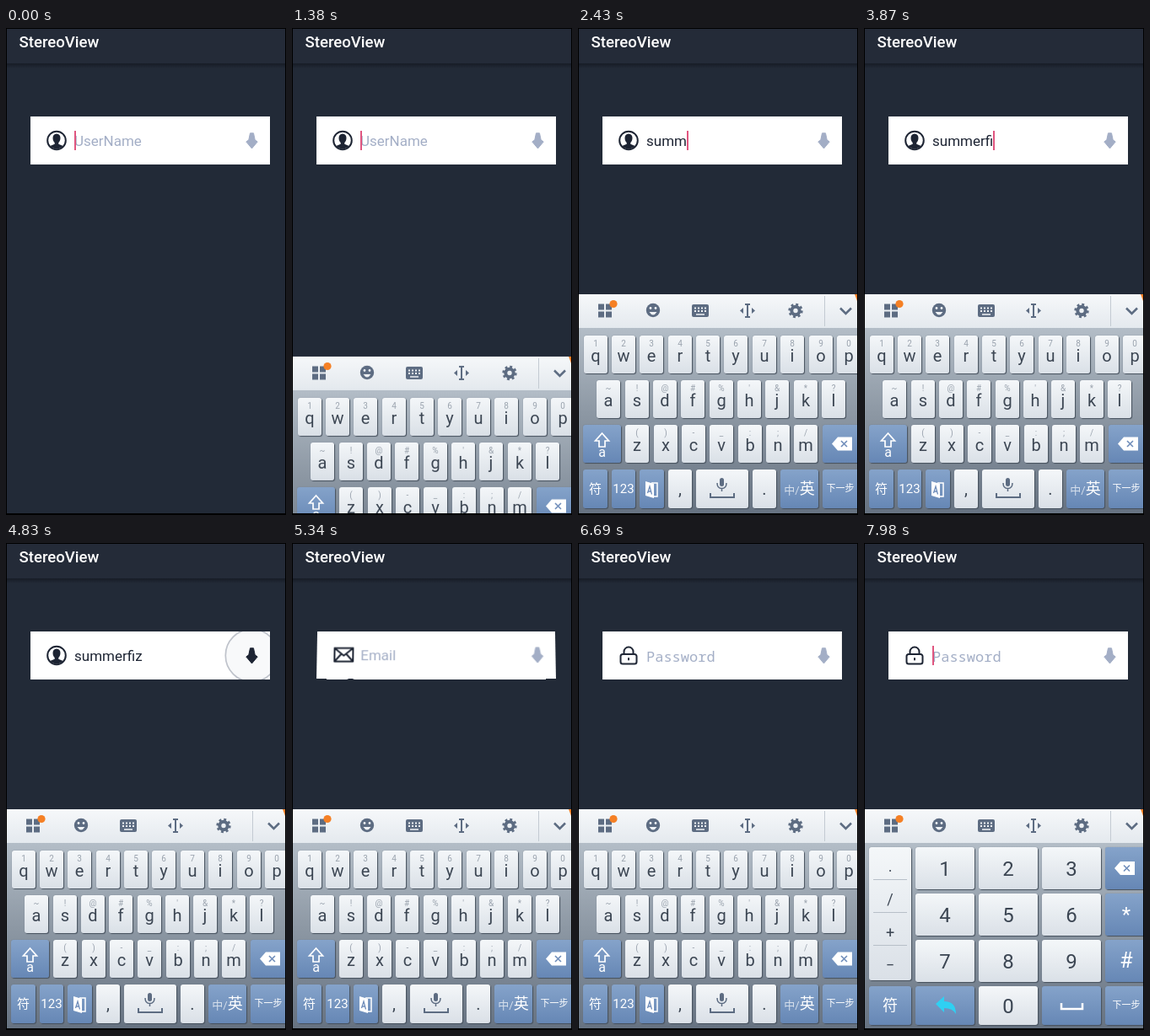
Animation, 332 px wide and 578 px high, one loop 8000 ms. Source, as an HTML page:

```html
<!DOCTYPE html>
<html lang="en">
<head>
<meta charset="utf-8">
<title>StereoView</title>
<style>
html, body { margin: 0; width: 100%; height: 100%; overflow: hidden; background: #000; }
body { --loop: 8s; --ink: #1d2433; --pale: #a3aec6; font-family: Roboto, "Noto Sans CJK SC", "Noto Sans CJK", sans-serif; }
#stage { position: absolute; left: 0; top: 0; width: 332px; height: 578px; overflow: hidden; background: #222a37; clip-path: inset(1px 1px 2px 1px); }
#stage div, #stage svg, #stage i { position: absolute; }
#bar { left: 0; top: 0; width: 332px; height: 42px; background: #242b38; }
#bar::after { content: ""; position: absolute; left: 0; top: 42px; width: 100%; height: 6px; background: linear-gradient(#171c26, #222a37); }
#bar span { position: absolute; left: 15.5px; top: 1px; font: 500 18.6px/33.5px Roboto, sans-serif; color: #fff; }

/* Rotating form */
#cube { left: 29px; top: 105px; width: 284px; height: 57px; overflow: hidden; }
.face { width: 284px; height: 57px; overflow: hidden; background: #fff; font-size: 17px; line-height: 59px; white-space: pre; animation: var(--loop) infinite; }
.face svg { left: 0; top: 0; }
.field { left: 52px; top: 0; color: var(--ink); }
.hint { left: 0; top: 0; color: var(--pale); }
.mono { font-family: "Noto Sans Mono", monospace; }
.caret { top: 17px; width: 2px; height: 23px; background: #e0557f; animation: var(--loop) step-end infinite; }
.arrow { fill: var(--pale); stroke: var(--pale); stroke-linejoin: round; animation: var(--loop) step-end infinite; }
.ripple { fill: #f8f9fa; stroke: #bfc3cb; stroke-width: 0; animation: var(--loop) linear infinite; }
.icon { fill: none; stroke: var(--ink); stroke-width: 2; stroke-linejoin: round; stroke-linecap: round; }

#user { transform-origin: top; animation-name: userTurn; }
#email { animation-name: emailTurn; }
#pass { transform-origin: bottom; animation-name: passTurn; }
@keyframes userTurn {
  0%, 60.75% { transform: translateY(0) perspective(185px) rotateX(0deg); animation-timing-function: cubic-bezier(.12,.48,.3,1); }
  68.25%, 100% { transform: translateY(57px) perspective(185px) rotateX(-90deg); }
}
@keyframes emailTurn {
  0%, 60.75% { transform-origin: 50% 100%; transform: translateY(-57px) perspective(185px) rotateX(90deg); animation-timing-function: cubic-bezier(.12,.48,.3,1); }
  68.25%, 70% { transform-origin: 50% 100%; transform: translateY(0) perspective(185px) rotateX(0deg); }
  70.01%, 76.5% { transform-origin: 50% 0; transform: translateY(0) perspective(185px) rotateX(0deg); animation-timing-function: cubic-bezier(.12,.48,.3,1); }
  84%, 100% { transform-origin: 50% 0; transform: translateY(57px) perspective(185px) rotateX(-90deg); }
}
@keyframes passTurn {
  0%, 76.5% { transform: translateY(-57px) perspective(185px) rotateX(90deg); animation-timing-function: cubic-bezier(.12,.48,.3,1); }
  84%, 100% { transform: translateY(0) perspective(185px) rotateX(0deg); }
}
#user .arrow { animation-name: userPress; }
#email .arrow { animation-name: emailPress; }
@keyframes userPress { 52.5%, 100% { fill: #1d2433; stroke: #1d2433; } }
@keyframes emailPress { 68.625%, 100% { fill: #1d2433; stroke: #1d2433; } }
#user .ripple { animation-name: userRipple; }
#email .ripple { animation-name: emailRipple; }
@keyframes userRipple {
  0%, 54.75% { r: 0; stroke-width: 0; }
  57.375% { r: 8px; stroke-width: 16px; }
  60.75% { r: 34px; stroke-width: 0; }
  60.76%, 100% { r: 0; stroke-width: 0; }
}
@keyframes emailRipple {
  0%, 75.375% { r: 0; stroke-width: 0; }
  78% { r: 8px; stroke-width: 16px; }
  81.375% { r: 34px; stroke-width: 0; }
  81.385%, 100% { r: 0; stroke-width: 0; }
}
#user .caret { animation-name: userCaret; }
#pass .caret { left: 0; animation-name: passCaret; }
@keyframes userCaret { 0%, 15.375% { opacity: 1; } 12.75%, 54.75%, 100% { opacity: 0; } }
@keyframes passCaret { 0% { opacity: 0; } 91.875%, 100% { opacity: 1; } }

/* Keyboard */
#keyboard { left: 0; top: 0; width: 332px; height: 578px; animation: slide var(--loop) infinite; }
@keyframes slide {
  0%, 15.36% { transform: translateY(263px); animation-timing-function: cubic-bezier(.25,.46,.45,.94); }
  19.61%, 100% { transform: none; }
}
#tools { left: 0; top: 316px; width: 332px; height: 40px; background: linear-gradient(#f6f8fa, #e4e9ee); }
#tools svg { top: -1px; }
#bed { left: 0; top: 356px; width: 332px; height: 222px; background: linear-gradient(#b3bdc7, #8d98a4 45%, #667281); }
#letters { animation: lettersOut var(--loop) step-end infinite; }
#digits { animation: digitsIn var(--loop) step-end infinite; }
@keyframes lettersOut { 0% { opacity: 1; } 98.25%, 100% { opacity: 0; } }
@keyframes digitsIn { 0% { opacity: 0; } 98.25%, 100% { opacity: 1; } }
.key { border-radius: 3px; background: linear-gradient(#f4f7f9, #dae0e7); box-shadow: 1px 1px 1px #46505d, 0 0 1px #5f6a78; color: #3c4653; text-align: center; font-size: 20px; }
.blue { background: linear-gradient(#85a3ca, #6687b5); color: #fff; }
.sub { left: 0; top: 4px; width: 100%; font-size: 10px; line-height: 12px; color: #9aa3ae; }
.cell { left: 0; width: 100%; height: 39px; line-height: 46px; font-size: 18px; }
.cell + .cell { box-shadow: 0 -1px #b7bfc8; margin: 0 5px; width: 40px; }
#popup { width: 49px; height: 56px; border-radius: 3px; background: linear-gradient(#fbfcfc, #eef1f4); box-shadow: 0 1px 3px #4a5563; color: #3d92e4; font-size: 29px; line-height: 62px; text-align: center; visibility: hidden; }
#popup::after { content: ""; position: absolute; left: 18.5px; top: 56px; border: 6px solid transparent; border-top-color: #eef1f4; }
</style>
</head>
<body>
<div id="stage">
  <div id="bar"><span>StereoView</span></div>

  <div id="cube">
    <div class="face" id="user">
      <svg width="284" height="57">
        <circle class="icon" cx="31" cy="28.500" r="10.800"/>
        <path fill="#1d2433" d="M31 20.500c3 0 4.500 2.200 4.500 5s-1.200 4.500-2.200 5.600v1.600l5.400 2.400a10.500 10.500 0 0 1-15.400 0l5.400-2.400v-1.600c-1-1.100-2.200-2.800-2.200-5.600s1.500-5 4.500-5z"/>
      </svg>
      <div class="field"><div class="hint" id="hint">UserName</div><span id="typed"></span><i class="caret"></i></div>
    </div>
    <div class="face" id="email">
      <svg width="284" height="57">
        <path class="icon" d="M21 20.500h22v16h-22zl11 9 11-9M21 36.500l8-9M43 36.500l-8-9"/>
      </svg>
      <div class="field"><div class="hint">Email</div></div>
    </div>
    <div class="face" id="pass">
      <svg width="284" height="57">
        <path class="icon" d="M24 27h14a2.500 2.500 0 0 1 2.500 2.500v6.500a2.500 2.500 0 0 1-2.500 2.500h-14a2.500 2.500 0 0 1-2.500-2.500v-6.500a2.500 2.500 0 0 1 2.500-2.500zM25.500 27v-3a5.500 5.500 0 0 1 11 0v3M31 32v1.500"/>
      </svg>
      <div class="field"><div class="hint mono">Password</div><i class="caret"></i></div>
    </div>
  </div>

  <div id="keyboard">
    <div id="tools">
      <svg width="332" height="41" fill="#5d6c82">
        <path d="M24 12.500h7v7h-7zM33 12.500h7v7h-7zM24 21.500h7v7h-7zM33 21.500h7v7h-7z"/>
        <circle cx="42" cy="12.500" r="4.600" fill="#f58025"/>
        <circle cx="89" cy="20" r="8.200"/>
        <path d="M84.500 22q4.500 7 9 0z" fill="#f0f3f6"/>
        <circle cx="86" cy="17.500" r="1.400" fill="#f0f3f6"/><circle cx="92" cy="17.500" r="1.400" fill="#f0f3f6"/>
        <rect x="135" y="13" width="20" height="15" rx="2"/>
        <path d="M138 17.500h15M138 21h15" stroke="#f0f3f6" stroke-width="2" stroke-dasharray="2 2"/>
        <path d="M140 25h10" stroke="#f0f3f6" stroke-width="1.500"/>
        <path d="M198 13h6M201 13v15M198 28h6" stroke="#5d6c82" stroke-width="2"/>
        <path d="M196 17v7l-4-3.500zM206 17v7l4-3.500z"/>
        <circle cx="258" cy="20.500" r="4.700" fill="none" stroke="#5d6c82" stroke-width="4"/>
        <circle cx="258" cy="20.500" r="7.200" fill="none" stroke="#5d6c82" stroke-width="3" stroke-dasharray="2.830 2.830"/>
        <path d="M292.500 3v36" stroke="#c3cad2"/>
        <path d="M311 17.500l6.500 6.500 6.500-6.500" fill="none" stroke="#5d6c82" stroke-width="2.500"/>
        <path d="M328 1h4v11q-2-6-4-11z" fill="#f58025"/>
      </svg>
    </div>
    <div id="bed"></div>
    <div id="letters"></div>
    <div id="digits"></div>
    <div id="popup"></div>
  </div>
</div>

<script>
const $ = id => document.getElementById(id);
const letters = $('letters'), digits = $('digits'), popup = $('popup');
const keys = {};

function add(parent, cls, html) {
  const el = document.createElement('div');
  el.className = cls;
  el.innerHTML = html;
  parent.append(el);
  return el;
}

function key(parent, x, y, w, h, html, { cls = '', size = 20, drop = 0 } = {}) {
  const el = add(parent, 'key ' + cls, html);
  el.style.cssText = `left:${x}px;top:${y}px;width:${w}px;height:${h}px;font-size:${size}px;line-height:${h + drop}px`;
  return el;
}

const icon = (w, h, body) =>
  `<svg width="${w}" height="${h}" style="left:0;top:0" fill="none" stroke="#fff" stroke-width="2">${body}</svg>`;
const backspace = (w, h) => icon(w, h, `<g transform="translate(11 ${h / 2 - 8})">
  <path d="M0 8l7-8h17v16h-17z" fill="#fff" stroke="none"/><path d="M11 4.500l7 7M18 4.500l-7 7" stroke="#6f8dba" stroke-width="1.600"/></g>`);

// Letter rows: letters, upper symbols, left edge, top edge
[['qwertyuiop', '1234567890', 6.7, 365],
 ['asdfghjkl', "~!@#%'&*?", 22.3, 418],
 ['zxcvbnm', '()-_:;/', 56.3, 471]].forEach(([row, marks, left, y]) => {
  [...row].forEach((ch, i) => {
    const x = Math.round(left + i * 33.35);
    key(letters, x, y, 28, 45, `<div class="sub">${marks[i].replace('&', '&amp;')}</div>${ch}`, { drop: 4 });
    keys[ch] = [x + 14, y];
  });
});

const blue = (size, drop = 0) => ({ cls: 'blue', size, drop });
key(letters, 6, 471, 45, 45, icon(45, 45, '<path d="M22.500 10l-8 9h4.500v7h7v-7h4.500z" stroke-width="1.700"/>') + 'a', blue(16, 20));
key(letters, 290, 471, 45, 45, backspace(45, 45), blue(16));
key(letters, 6, 524, 29, 46, '符', blue(15));
key(letters, 40, 524, 28, 46, '123', blue(15));
key(letters, 73, 524, 29, 46, icon(29, 46, '<path d="M14 16h7v16h-6" stroke-width="1.500"/><path d="M7 14l10 3v17l-10-3z" fill="#fff" stroke="none"/><path d="M9.500 28l2.500-8 2.500 9.500M10.500 26h3.500" stroke="#6f8dba" stroke-width="1.300"/>'), blue(15));
key(letters, 107, 524, 28, 46, ',');
key(letters, 140, 524, 62, 46, icon(62, 46, `<g stroke="#5d6c82"><rect x="28" y="10" width="5" height="10" rx="2.500" fill="#5d6c82" stroke="none"/>
  <path d="M25 16q0 6.500 5.500 6.500t5.500-6.500M30.500 22v4" stroke-width="1.500"/><path d="M17 28v5h28v-5"/></g>`));
key(letters, 207, 524, 28, 46, '.');
key(letters, 240, 524, 45, 46, '<span style="font-size:13px;opacity:.7">中/</span>英', blue(18));
key(letters, 290, 524, 45, 46, '<span style="margin-right:3px">下一步</span>', blue(11));

// Number pad
const rows = [361, 416, 471];
const side = key(digits, 6, 361, 50, 158, '');
['.', '/', '+', '−'].forEach((ch, i) => add(side, 'cell', ch).style.top = i * 39 + 'px');
rows.forEach((y, r) => [61, 136, 211].forEach((x, c) =>
  key(digits, x, y, 70, 50, r * 3 + c + 1, { size: 24, drop: 2 })));
key(digits, 286, rows[0], 50, 50, backspace(50, 50), blue(20));
key(digits, 286, rows[1], 50, 50, '*', blue(24));
key(digits, 286, rows[2], 50, 50, '#', blue(25));
key(digits, 6, 526, 50, 46, '符', blue(18));
key(digits, 61, 526, 70, 46, icon(70, 46, '<path d="M24 21l10-9v6q14 0 14 15q-4-7-14-7v5z" fill="#2fd0f2" stroke="none"/>'), blue(18));
key(digits, 136, 526, 70, 46, '0', { size: 24, drop: 2 });
key(digits, 211, 526, 70, 46, icon(70, 46, '<path d="M23 20v7h25v-7" stroke-width="2.500"/>'), blue(18));
key(digits, 286, 526, 50, 46, '下一步', blue(11));

// Every face has the same arrow and ripple
document.querySelectorAll('.face svg').forEach(svg => svg.insertAdjacentHTML('beforeend',
  '<circle class="ripple" cx="262.500" cy="28.500" r="0"/>' +
  '<path class="arrow" d="M260.500 19.800h4l1.700 8 3 2.200-6.700 8-6.700-8 3-2.200z"/>'));

// Letter, press time, release time
const strokes = [
  ['s', 1890, 1950], ['u', 2040, 2100], ['m', 2190, 2250], ['m', 2310, 2370], ['e', 2460, 2520],
  ['r', 2790, 2850], ['f', 2970, 3060], ['i', 3210, 3300], ['z', 3855, 3895]
];

const clock = $('keyboard').getAnimations()[0];
const caret = document.querySelector('#user .caret');

function frame() {
  const t = clock.currentTime % 8000;
  const text = strokes.filter(s => t >= s[1]).map(s => s[0]).join('');
  if ($('typed').textContent !== text) $('typed').textContent = text;
  $('hint').style.visibility = text ? 'hidden' : 'visible';
  caret.style.left = $('typed').offsetWidth + 'px';

  const held = strokes.find(s => t >= s[1] && t < s[2]);
  popup.style.visibility = held ? 'visible' : 'hidden';
  if (held) {
    const [x, y] = keys[held[0]];
    popup.textContent = held[0].toUpperCase();
    popup.style.left = x - 24.5 + 'px';
    popup.style.top = y - 63 + 'px';
  }
  requestAnimationFrame(frame);
}
frame();
</script>
</body>
</html>
```
